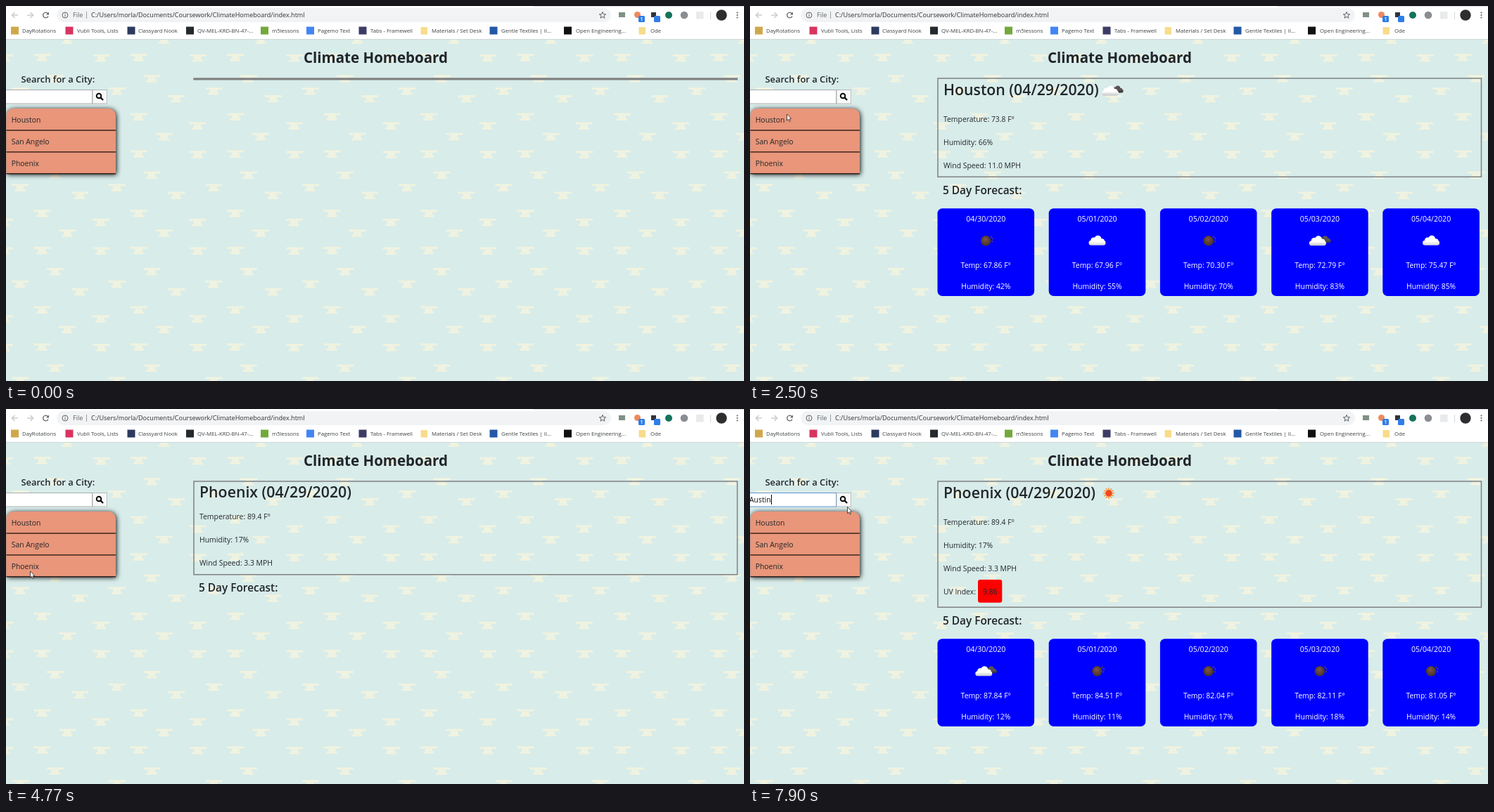
These frames come from a looping animation (1049x534 px, 8 s). An HTML page with a canvas:

```html
<!DOCTYPE html>
<html lang="en">
<head>
<meta charset="utf-8">
<title>Climate Homeboard</title>
<style>
html, body { margin: 0; width: 100%; height: 100%; overflow: hidden; background: #d8ecea; }
canvas { display: block; }
</style>
</head>
<body>
<canvas id="stage" width="1049" height="534"></canvas>
<script>
const ctx = document.getElementById('stage').getContext('2d');
const LOOP = 8000, W = 1049, H = 534;
const FAMILY = '"Open Sans", "Noto Sans", sans-serif';
const INK = '#212529';

function rect(x, y, w, h, color) {
  ctx.fillStyle = color;
  ctx.fillRect(x, y, w, h);
}
function round(x, y, w, h, r, color) {
  ctx.fillStyle = color;
  ctx.beginPath();
  ctx.roundRect(x, y, w, h, r);
  ctx.fill();
}
function disc(x, y, r, color) {
  ctx.fillStyle = color;
  ctx.beginPath();
  ctx.arc(x, y, r, 0, Math.PI * 2);
  ctx.fill();
}
function frame(x, y, w, h, color, lw = 1) {
  ctx.strokeStyle = color;
  ctx.lineWidth = lw;
  ctx.strokeRect(x, y, w, h);
}
// Open polyline from flat coordinates
function line(color, lw, ...p) {
  ctx.strokeStyle = color;
  ctx.lineWidth = lw;
  ctx.beginPath();
  for (let i = 0; i < p.length; i += 2) ctx.lineTo(p[i], p[i + 1]);
  ctx.stroke();
}
function text(s, x, y, size, color = INK, weight = 400, align = 'left') {
  ctx.font = `${weight} ${size}px ${FAMILY}`;
  ctx.textAlign = align;
  ctx.fillStyle = color;
  ctx.fillText(s, x, y);
}

// Browser bars
const BOOKMARKS = [
  [7, '#d0a84c', 23, 'DayRotations'],
  [84.5, '#d8345f', 101, 'Vubli Tools, Lists'],
  [172.5, '#2c3a5e', 188, 'Classyard Nook'],
  [256, '#24292e', 272, 'QV-MEL-KRD-BN-47-...'],
  [362, '#73a93c', 378, 'm5lessons'],
  [427, '#4285f4', 443, 'Pagemo Text'],
  [501.5, '#3b3b66', 518, 'Tabs - Framewell'],
  [589, 'folder', 605, 'Materials / Set Desk'],
  [687.5, '#2458a6', 704, 'Gentle Textiles | Il...'],
  [793, '#111', 810, 'Open Engineering...'],
  [899, 'folder', 916, 'Ode']
];

function drawNavigation() {
  const pale = '#c4c6c9', dark = '#5f6368';
  line(pale, 1.3, 17, 13, 8.5, 13);
  line(pale, 1.3, 12.5, 9, 8.5, 13, 12.5, 17);
  line(pale, 1.3, 30, 13, 38.5, 13);
  line(pale, 1.3, 34.5, 9, 38.5, 13, 34.5, 17);
  ctx.strokeStyle = dark;
  ctx.lineWidth = 1.3;
  ctx.beginPath();
  ctx.arc(56.5, 13, 3.8, 0.4, Math.PI * 1.8);
  ctx.stroke();
  ctx.fillStyle = dark;
  ctx.beginPath();
  ctx.moveTo(61, 8.5);
  ctx.lineTo(61, 12.6);
  ctx.lineTo(57, 12.6);
  ctx.fill();

  round(72, 3, 788, 20, 10, '#f1f3f4');
  ctx.strokeStyle = dark;
  ctx.lineWidth = 1;
  ctx.beginPath();
  ctx.arc(84, 13, 4, 0, 7);
  ctx.stroke();
  rect(83.5, 12.3, 1, 3, dark);
  rect(83.5, 10.4, 1, 1, dark);
  text('File', 95, 16.4, 9.05, dark);
  rect(114, 8, 1, 10, '#9aa0a6');
  text('C:/Users/morla/Documents/Coursework/ClimateHomeboard/index.html', 121, 16.4, 9.05, '#303134');

  ctx.beginPath();
  for (let i = 0; i < 10; i++) {
    const a = -Math.PI / 2 + i * Math.PI / 5, r = i % 2 ? 2.1 : 4.9;
    ctx.lineTo(848 + r * Math.cos(a), 13.3 + r * Math.sin(a));
  }
  ctx.closePath();
  ctx.strokeStyle = dark;
  ctx.stroke();
}

function drawExtensions() {
  const blue = '#2f7de9';
  rect(871, 9, 9, 7, '#7d9184');
  disc(897.5, 12.5, 4.5, '#ee8a5c');
  round(899, 14, 9, 9, 1.5, blue);
  text('1', 903.5, 21, 7, '#fff', 600, 'center');
  rect(917, 9, 7, 7, '#30343a');
  round(921, 14, 9, 9, 1.5, blue);
  disc(942, 13, 5, '#14735c');
  disc(964, 13, 5.3, '#8a8d91');
  rect(981, 8, 10.5, 10.5, '#e9eaeb');
  rect(1001, 8, 1, 11, '#d5d7da');
  disc(1017, 13, 7.7, '#2e2e30');
  for (const y of [9.5, 13, 16.5]) disc(1039.5, y, 1.1, '#5f6368');
}

function drawBrowser() {
  rect(0, 0, W, 47, '#fff');
  rect(749, 0, 300, 1, '#dee1e6');
  drawNavigation();
  drawExtensions();
  for (const [x, color, tx, label] of BOOKMARKS) {
    if (color === 'folder') round(x + 0.5, 30, 9.5, 10.5, 1, '#f7dc8b');
    else rect(x, 29.5, 11, 11, color);
    text(label, tx, 38, 7.75, '#3c4043');
  }
  rect(0, 47, W, 1, '#cfd6d8');
}

// Repeating wallpaper of small stepped clouds
const TILE = 137.4;
const MOTIFS = [[70, 103.7], [20.5, 121.5], [105, 132.5], [51.5, 158.2],
  [135, 171], [87.5, 186.3], [51.5, 211], [135.5, 211.8]];

function drawWallpaper() {
  rect(0, 47, W, H - 47, '#d8ecea');
  for (const [mx, my] of MOTIFS)
    for (let y = my - TILE; y < H + 10; y += TILE)
      for (let x = mx - TILE; x < W + 20; x += TILE) {
        rect(x - 12, y - 5.5, 24, 3, '#f0f3e0');
        rect(x - 5.5, y - 2.5, 10.5, 4.5, '#f0f3e0');
        rect(x - 8, y + 2, 15, 3, '#f0f3e0');
      }
}

// Weather pictures
function puff(x, y, s, top, bottom) {
  const g = ctx.createLinearGradient(0, y - 7 * s, 0, y + 7 * s);
  g.addColorStop(0, top);
  g.addColorStop(0.6, top);
  g.addColorStop(1, bottom);
  ctx.fillStyle = g;
  ctx.beginPath();
  ctx.roundRect(x - 12 * s, y, 24 * s, 7 * s, 3.5 * s);
  for (const [dx, dy, r] of [[-5, 0, 4.2], [1, -2, 5], [6.5, 1.5, 4]]) {
    ctx.moveTo(x + (dx + r) * s, y + dy * s);
    ctx.arc(x + dx * s, y + dy * s, r * s, 0, 7);
  }
  ctx.fill();
}
const ICONS = {
  cloud(x, y) { puff(x, y, 1, '#fff', '#d2d2d8'); },
  broken(x, y) {
    puff(x + 7, y - 1.5, 0.72, '#5a5353', '#2f2b2b');
    puff(x - 3, y + 0.5, 1, '#fff', '#c2c2c8');
  },
  night(x, y) {
    const g = ctx.createRadialGradient(x - 1, y - 2, 1, x, y, 7.5);
    g.addColorStop(0, '#7a5546');
    g.addColorStop(1, '#46322c');
    disc(x, y + 0.5, 7.2, g);
    for (const [dx, dy] of [[7.5, -5], [9.5, -2.5], [9, 1.5]]) disc(x + dx, y + dy, 0.95, '#6a5050');
  },
  sun(x, y) {
    for (let i = 0; i < 12; i++) {
      const a = i * Math.PI / 6, c = Math.cos(a), s = Math.sin(a);
      line('#f6a04a', 1.7, x + 4 * c, y + 4 * s, x + 8 * c, y + 8 * s);
    }
    disc(x, y, 4.7, '#f0481c');
  }
};

// Page
function drawSidebar(t) {
  text('Search for a City:', 21.5, 108.7, 12.9, INK, 600);

  rect(-2, 119, 125, 20.5, '#fff');
  frame(-2, 119.5, 124.5, 19.5, t >= 5670 ? '#5f92d8' : '#a9adb0');
  rect(123, 119, 21.5, 20.5, '#f8f8f8');
  frame(123, 119.5, 20.5, 19.5, '#b3b8b9');
  ctx.strokeStyle = '#000';
  ctx.lineWidth = 1.9;
  ctx.beginPath();
  ctx.arc(132, 128, 3.3, 0, 7);
  ctx.stroke();
  line('#000', 2.3, 134.4, 130.4, 138, 134);

  if (t >= 6310) {
    const typed = 'Austin'.slice(0, 1 + Math.floor((t - 6310) / 90));
    text(typed, -1, 133, 10.4, '#111');
    if (t < 7320 || t >= 7820)
      rect(Math.round(ctx.measureText(typed).width - 0.8), 122, 1, 14, '#000');
  }

  ctx.save();
  ctx.shadowColor = 'rgba(0,0,0,.95)';
  ctx.shadowBlur = 7.5;
  ctx.shadowOffsetX = 1;
  ctx.shadowOffsetY = 1;
  round(0.5, 146, 155.5, 93, [10, 10, 0, 0], '#e9967a');
  ctx.restore();
  ['Houston', 'San Angelo', 'Phoenix'].forEach((city, i) => {
    text(city, 7.7, 165.8 + 31 * i, 10.4);
    rect(0.5, 176.4 + 30.9 * i, 155.5, 1.2, '#120b09');
  });
}

const DATES = ['04/30/2020', '05/01/2020', '05/02/2020', '05/03/2020', '05/04/2020'];
const REPORTS = {
  Houston: {
    icon: 'broken', iconX: 515, now: ['73.8', '66', '11.0'], uv: '9.72',
    days: [['night', '67.86', 42], ['cloud', '67.96', 55], ['night', '70.30', 70],
      ['broken', '72.79', 83], ['cloud', '75.47', 85]]
  },
  Phoenix: {
    icon: 'sun', iconX: 510, now: ['89.4', '17', '3.3'], uv: '9.86',
    days: [['broken', '87.84', 12], ['night', '84.51', 11], ['night', '82.04', 17],
      ['night', '82.11', 18], ['night', '81.05', 14]]
  }
};

// stage 0: text only, 1: pictures and cards, 2: UV row as well
function drawReport(city, stage) {
  const { icon, iconX, now, uv, days } = REPORTS[city];
  const bottom = [236.5, 244, 283][stage];
  const lift = stage ? 0 : 7.7;
  frame(267, 103, 772.5, bottom - 103.7, '#808080', 1.5);
  text(`${city} (04/29/2020)`, 275, stage ? 126.7 : 126, 21.3, INK, 600);
  if (stage) ICONS[icon](iconX, 120);
  text(`Temperature: ${now[0]} F°`, 275, 164.5 - lift, 10.4);
  text(`Humidity: ${now[1]}%`, 275, 197.5 - lift, 10.4);
  text(`Wind Speed: ${now[2]} MPH`, 275, 230.5 - lift, 10.4);
  if (stage === 2) {
    text('UV Index:', 275, 263.5, 10.4);
    round(324, 243, 34.3, 32.7, 3, '#f00');
    text(uv, 331, 263.5, 10.4);
  }
  text('5 Day Forecast:', 274, bottom + 23.8, 15.4, INK, 600);
  if (!stage) return;
  days.forEach(([sky, temp, humid], i) => {
    const x = 266.5 + 158.2 * i, y = bottom + 44.3, mid = x + 68.8;
    round(x, y, 137.6, 124.8, 7, '#00f');
    text(DATES[i], mid, y + 19, 10.6, '#fff', 400, 'center');
    ICONS[sky](mid, y + 45.5);
    text(`Temp: ${temp} F°`, mid, y + 84.2, 10.4, '#fff', 400, 'center');
    text(`Humidity: ${humid}%`, mid, y + 114.4, 10.4, '#fff', 400, 'center');
  });
}

function drawMain(t) {
  text('Climate Homeboard', 525.5, 81, 20.5, INK, 700, 'center');
  if (t < 2420) rect(266.3, 102.3, 773.7, 3.2, '#808080');
  else if (t < 4770) drawReport('Houston', t < 2500 ? 0 : t < 2570 ? 1 : 2);
  else drawReport('Phoenix', t < 4820 ? 0 : t < 4920 ? 1 : 2);
}

// Mouse: time, x, y
const PATH = [[230, 967, 531], [880, 77, 119], [1110, 77, 119], [1200, 72, 128],
  [1579, 72, 128], [1580, 68.5, 130], [1770, 52.5, 154], [3539, 52.5, 154],
  [3540, 52, 157], [4120, 34.5, 231], [5170, 34.5, 231], [5490, 43, 126],
  [7550, 43, 126], [7690, 80, 104], [7900, 138.5, 139.5]];
const CLICKS = [[1970, 2040], [4470, 4620], [5670, 5750]];

function mouseAt(t) {
  const i = PATH.findIndex(p => p[0] > t);
  if (i < 0) return PATH[PATH.length - 1].slice(1);
  const [t0, x0, y0] = PATH[i - 1], [t1, x1, y1] = PATH[i];
  const u = (t - t0) / (t1 - t0), k = u * u * (3 - 2 * u);
  return [x0 + (x1 - x0) * k, y0 + (y1 - y0) * k];
}

function drawMouse(t) {
  if (t < 230) return;
  const [x, y] = mouseAt(t);
  if (CLICKS.some(([a, b]) => t >= a && t < b)) disc(x, y, 8.4, 'rgba(255,255,0,.47)');
  const overField = x < 122 && y >= 119 && y < 139.5;
  const overLabel = x > 21 && x < 127 && y > 97 && y < 113;
  if (overField || overLabel) {
    line('#222', 1, x, y - 4, x, y + 4);
    line('#222', 1, x - 2.5, y - 4.5, x + 2.5, y - 4.5);
    line('#222', 1, x - 2.5, y + 4.5, x + 2.5, y + 4.5);
    return;
  }
  ctx.beginPath();
  for (const [dx, dy] of [[0, 0], [0, 9], [2, 7.3], [3.5, 10.6], [5, 9.9], [3.6, 6.8], [6.2, 6.4]])
    ctx.lineTo(x + dx, y + dy);
  ctx.closePath();
  ctx.fillStyle = '#fff';
  ctx.fill();
  ctx.strokeStyle = '#222';
  ctx.lineWidth = 0.8;
  ctx.stroke();
}

function draw() {
  const t = performance.now() % LOOP;
  drawWallpaper();
  drawBrowser();
  drawMain(t);
  drawSidebar(t);
  drawMouse(t);
  requestAnimationFrame(draw);
}
draw();
</script>
</body>
</html>
```
